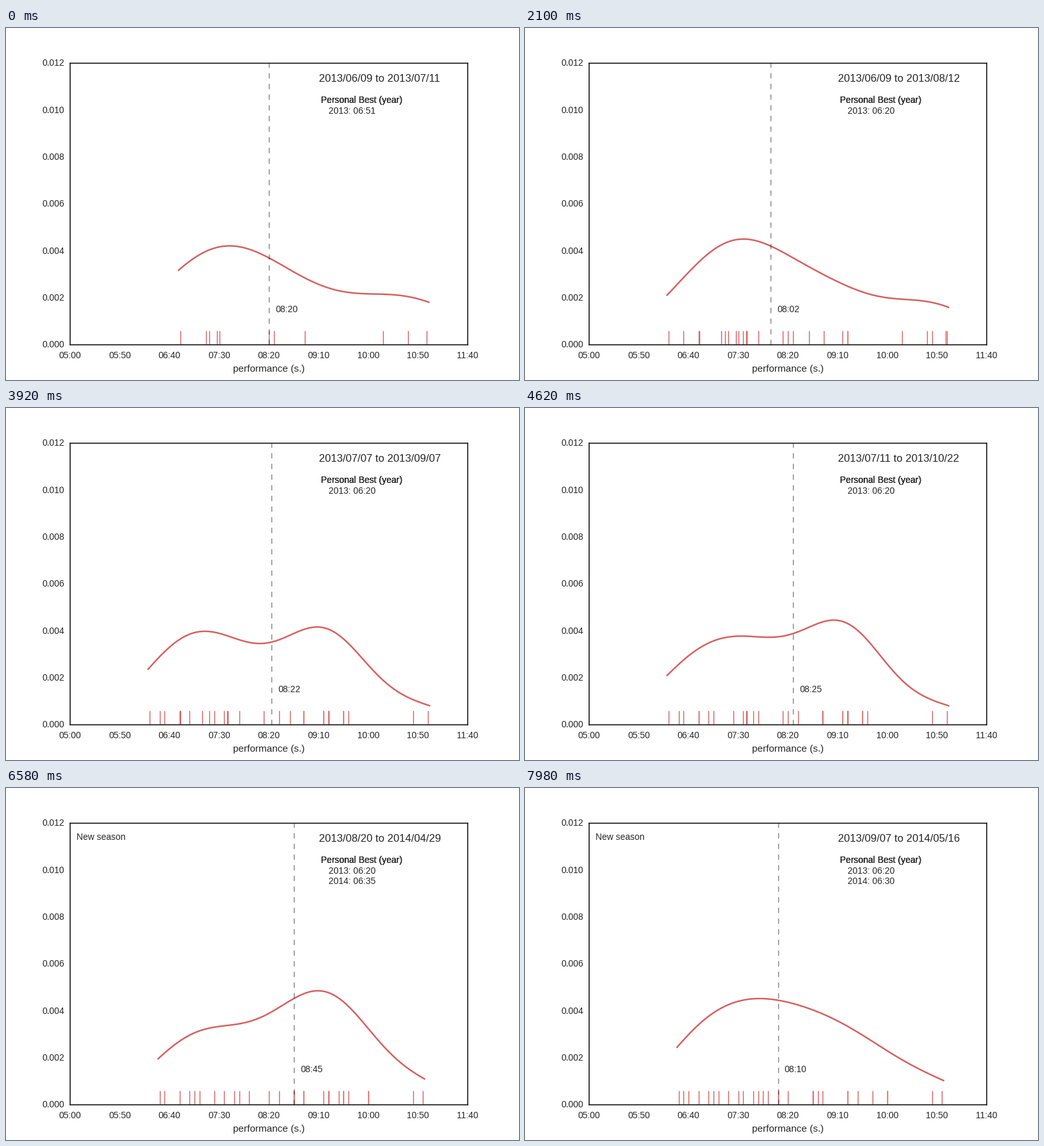
Recreate the animation shown at these times as a matplotlib script. Size 800x550 px, loop 8 s.

```python
import numpy as np
import matplotlib.pyplot as plt
from matplotlib.animation import FuncAnimation

plt.rcParams["font.family"] = "Liberation Sans"

INK, RED = "0.15", "#d65f5f"
FIRST, WINDOW = 11, 30          # runs shown at the start, most runs shown
TICK, STEP, LOOP = 20, 140, 8000

# Run times in seconds, oldest first
RUNS = np.array([
    615, 505, 450, 640, 500, 437, 659, 448, 536, 440, 411,
    521, 433, 560, 645, 459, 395, 458, 380,
    555, 495, 455, 410, 660, 560, 470, 535, 420, 580, 445, 575, 410, 555,
    535, 575, 390, 510, 560, 560, 425, 500, 535, 465, 560,
    655, 525, 480, 395, 600, 525, 420, 470, 525,
    645, 570, 430, 600, 455, 390, 585, 490, 410, 400,
    530, 475, 450, 490, 440])

# Days since the first run, given at a few runs
KEY_RUN = [0, 3, 10, 14, 18, 23, 32, 33, 38, 43, 44, 52, 62, 67]
KEY_DAY = [0, 5, 32, 32, 46, 59, 83, 83, 90, 135, 304, 317, 332, 341]
DAYS = np.rint(np.interp(np.arange(len(RUNS)), KEY_RUN, KEY_DAY)).astype(int)
DATES = [str(d).replace("-", "/") for d in np.datetime64("2013-06-09") + DAYS]
YEARS = np.array([int(d[:4]) for d in DATES])


def clock(seconds):
    return "%02d:%02d" % divmod(int(seconds), 60)


def density(data):
    """Gaussian kernel density with Scott's bandwidth."""
    factor = len(data) ** -0.2
    width = factor * data.std(ddof=1)
    x = np.linspace(data.min() - 3 * factor, data.max() + 3 * factor, 100)
    z = (x[:, None] - data) / width
    return x, np.exp(-z * z / 2).mean(axis=1) / (width * np.sqrt(2 * np.pi))


fig = plt.figure(figsize=(8, 5.5), dpi=100, facecolor="white")
ax = fig.add_axes([0.125, 0.1, 0.775, 0.8])
ax.set(xlim=(300, 700), ylim=(0, 0.012), xticks=[], yticks=[])
for spine in ax.spines.values():
    spine.set(linewidth=1.25, edgecolor=INK)


def label(x, y, text="", size=10, ha="left"):
    return ax.text(x, y, text, size=size, ha=ha, va="baseline", color=INK)


PX = 0.012 / 440                # one pixel of height in data units
for s in range(300, 701, 50):
    label(s, -21 * PX, clock(s), ha="center")
for y in np.linspace(0, 0.012, 7):
    label(294.2, y - 4.2 * PX, f"{y:.3f}", ha="right")
label(500, -42 * PX, "performance (s.)", 11, "center")
for _ in range(3):              # overprinting gives the heavier look
    label(552, 0.0103, "Personal Best (year)")

curve, = ax.plot([], [], color=RED, lw=1.75)
rug = ax.vlines([], 0, 0.05, colors=RED, lw=1, zorder=2,
                transform=ax.get_xaxis_transform())
middle = ax.axvline(500, color="black", alpha=0.5, lw=1,
                    ls=(0, (6, 6)), zorder=3)
middle_text = label(500, 0.00138)
span = label(550, 0.0112, size=12)
bests = {2013: label(560, 0.00985), 2014: label(560, 0.0094)}
season = label(306.7, 0.0113)


def draw(i):
    end = FIRST + i * TICK // STEP
    start = max(0, end - WINDOW)
    data = RUNS[start:end]
    curve.set_data(*density(data))
    rug.set_segments([[(s, 0), (s, 0.05)] for s in data])

    median = np.median(data)
    middle.set_xdata([median, median])
    middle_text.set_x(median + 6.7)
    middle_text.set_text(clock(median))

    span.set_text(f"{DATES[start]} to {DATES[end - 1]}")
    for year, text in bests.items():
        times = RUNS[:end][YEARS[:end] == year]
        text.set_text(f"{year}: {clock(times.min())}" if times.size else "")
    season.set_text("New season" if YEARS[end - 1] > YEARS[0] else "")
    return curve, rug, middle, middle_text, span, season, *bests.values()


anim = FuncAnimation(fig, draw, frames=LOOP // TICK, interval=TICK,
                     init_func=lambda: draw(0), repeat=True, repeat_delay=0)
plt.show()
```
